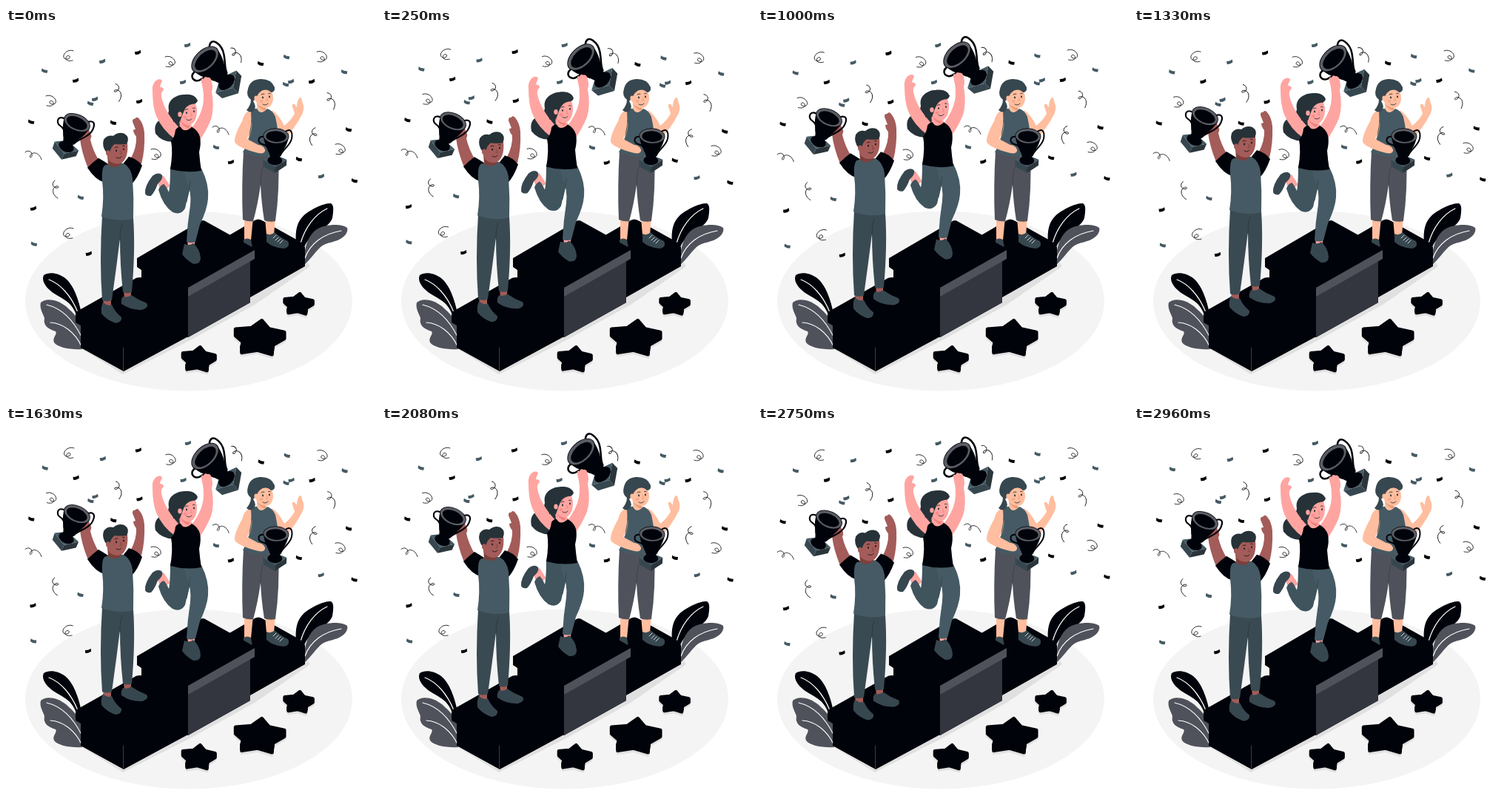
Animation, 500 px wide and 500 px high, one loop 3 s. Source, as an HTML page with a canvas:

```html
<!DOCTYPE html>
<html lang="en">
<head>
<meta charset="utf-8">
<title>Winners</title>
<style>
html, body { margin: 0; width: 100%; height: 100%; overflow: hidden; background: #fff; }
canvas { display: block; width: 500px; height: 500px; }
</style>
</head>
<body>
<canvas id="stage"></canvas>
<script>
const canvas = document.getElementById('stage');
const ctx = canvas.getContext('2d');
const ratio = window.devicePixelRatio || 1;
canvas.width = canvas.height = 500 * ratio;

const INK = '#01030a', HAIR = '#263238', SLATE = '#455a64', DEEP = '#37474f';
const GREY = '#50525b', FACE = '#33363f', LIGHT = '#f4f4f4', SHADOW = '#e0e0e0';
const BROWN = '#a35c59', BROWN_DARK = '#7c403b';
const PINK = '#ffa5a1', PINK_DARK = '#ee827e';
const PEACH = '#ffbe9f', PEACH_DARK = '#eb9a75';

function fill(d, color) {
  ctx.fillStyle = color;
  ctx.fill(new Path2D(d));
}

function line(d, color, width = 1) {
  ctx.strokeStyle = color;
  ctx.lineWidth = width;
  ctx.lineCap = ctx.lineJoin = 'round';
  ctx.stroke(new Path2D(d));
}

function oval(x, y, rx, ry, color, turn = 0) {
  ctx.fillStyle = color;
  ctx.beginPath();
  ctx.ellipse(x, y, rx, ry, turn, 0, Math.PI * 2);
  ctx.fill();
}

function group(x, y, turn, sx, sy, draw) {
  ctx.save();
  ctx.translate(x, y);
  ctx.rotate(turn * Math.PI / 180);
  ctx.scale(sx, sy);
  draw();
  ctx.restore();
}

// x, y, slant
const darkBits = [
  [178, 33, -1], [94, 71, -1], [34, 127, 1], [180, 99, -1], [145, 128, 1], [344, 48, 1],
  [413, 72, -1], [304, 181, -1], [396, 177, 1], [463, 137, 1], [471, 206, 1], [112, 305, -1], [37, 244, -1]
];
const greyBits = [
  [52, 58, 1], [130, 45, -1], [245, 23, -1], [239, 73, -1], [120, 96, -1], [114, 102, 1], [379, 39, 1],
  [378, 76, 1], [385, 72, -1], [457, 59, 1], [284, 161, 1], [426, 200, -1], [101, 229, 1], [38, 292, 1]
];
const HOOK = 'M-7 -7 C0 -10 8 -3 6 2 C4 6 -3 4 -2 1 C-1 -2 4 0 3 4 C2 7 -3 7 -6 6';
const WAVE = 'M-11 -4 C-6 -8 -1 -4 -2 1 C-3 5 -6 3 -4 0 C-1 -5 8 -4 11 6';
// x, y, turn, flip
const hooks = [
  [84, 38, 0, -1], [61, 99, 0, 1], [222, 46, 0, 1], [427, 39, 0, 1],
  [452, 164, 0, 1], [203, 171, 0, 1], [84, 278, 0, -1]
];
const waves = [
  [151, 87, 55, 1], [311, 36, 30, 1], [439, 98, 45, 1], [415, 146, -55, -1],
  [290, 138, 0, 1], [37, 172, 0, 1], [67, 218, -75, -1]
];

function bits(list, color) {
  for (const [x, y, slant] of list) {
    group(x, y, 0, slant, 1, () => fill('M-3.6 -3.3 Q0 -.4 4.2 -1 L3.6 2.9 Q-.5 3.6 -4.2 .5Z', color));
  }
}

function curls(list, shape) {
  for (const [x, y, turn, flip] of list) {
    group(x, y, turn, flip, 1, () => line(shape, '#15181c', .9));
  }
}

function confetti(angle) {
  group(252, 161, angle, 1, 1, () => {
    ctx.translate(-252, -161);
    bits(greyBits, SLATE);
    bits(darkBits, INK);
    curls(hooks, HOOK);
    curls(waves, WAVE);
  });
}

function trophy(x, y, turn, size) {
  group(x, y, turn, size, size, () => {
    fill('M-16 33 L1 42 L1 50 L-15 42Z', DEEP);
    fill('M1 42 L16 31 L16 39 L1 50Z', '#2b363c');
    fill('M-16 33 L-2 25 L16 31 L1 42Z', SLATE);
    oval(0, 33, 10, 6.3, INK);
    line('M-15 2 C-26 0 -25 11 -18 12 S-10 17 -8 22', INK, 2);
    line('M13 -7 C22 -14 24 1 18 10 S9 20 7 26', INK, 2);
    fill('M-17 0 C-16 14 -8 20 -6 30 Q0 34 6 30 C8 20 16 14 17 0Z', INK);
    oval(0, 0, 17.5, 10.5, INK);
    oval(0, 0, 16.8, 9.8, '#5b5d65');
    oval(0, .6, 13.6, 7.4, INK);
  });
}

function starPath(x, y, rx, ry) {
  ctx.beginPath();
  for (let i = 0; i < 10; i++) {
    const a = (-84 + i * 36) * Math.PI / 180;
    const k = i % 2 ? .58 : 1;
    ctx.lineTo(x + rx * k * Math.cos(a), y + ry * k * Math.sin(a));
  }
  ctx.closePath();
}

function star(x, y, rx, ry, depth) {
  ctx.lineJoin = 'round';
  ctx.lineWidth = 4.5;
  for (let i = depth + 3; i >= 0; i--) {
    ctx.fillStyle = ctx.strokeStyle = i > depth ? SHADOW : INK;
    starPath(x, y + i, rx, ry);
    ctx.fill();
    ctx.stroke();
  }
}

function leaves() {
  fill('M392 292 C391 274 392 262 405 251 C416 243 431 236 439 237 C444 239 442 250 441 257 C435 273 414 272 403 296Z', INK);
  line('M398 291 C404 270 417 252 434 244', '#fff', 1.2);
  fill('M403 320 C402 300 407 281 420 272 C432 265 453 264 461 270 C463 275 458 283 448 287 C436 291 430 291 424 297 C416 305 412 312 403 320Z', GREY);
  line('M404 311 C411 291 429 278 453 274', '#fff', 1.2);
  fill('M51 334 C58 329 71 331 80 338 C91 347 98 365 103 390 L95 388 C88 366 70 365 59 354 C52 348 48 340 51 334Z', INK);
  line('M58 340 C74 346 88 362 97 384', '#fff', 1.2);
  fill('M47 371 C54 364 70 367 81 376 C92 386 99 393 103 405 L103 434 C88 435 70 432 65 425 C62 418 70 414 67 410 C55 406 50 401 52 392 C49 384 45 378 47 371Z', GREY);
  line('M55 374 C76 379 91 395 102 417', '#fff', 1.1);
  line('M60 398 C77 399 93 411 102 430', '#fff', 1.1);
}

function sidePodiums() {
  fill('M98 431 L158 468 L247 423 L336 374 L411 322 L404 312Z', SHADOW);
  leaves();
  fill('M300 281 L336 260 Q341 257 346 260 L398 289 L404 296 L404 322 L330 364 L300 330Z', INK);
}

function mainPodium() {
  fill('M94 384 L172 340 Q178 335 186 338 L260 380 L246 417 L159 464 L101 432 L101 402 L94 398Z', INK);
  line('M158.5 432 V463', '#4a4d55', .8);
  fill('M177 311 L261 262 Q266 258 271 262 L336 298 L336 312 L330 316 L330 371 L246 418 L183 380 L183 327 L177 323Z', INK);
  fill('M246 360 L330 313 L330 371 L246 418Z', FACE);
  fill('M246 351 L336 300 L336 312 L246 363Z', GREY);
}

function face(x, y, gap, lift, ink, blush) {
  oval(x, y, 1, 1.4, ink);
  oval(x + gap, y - lift, 1, 1.4, ink);
  line(`M${x - 2} ${y - 4} q2 -1.8 4 -.8 M${x + gap - 1.5} ${y - lift - 4.5} q2 -1 3 .4`, ink, .9);
  line(`M${x + gap * .55} ${y} l1.8 4 l-2.2 .4`, blush, .9);
  line(`M${x} ${y + 9} q4 2.6 7 -1`, ink, .9);
}

function thirdPlace() {
  fill('M322 256 H334 L331 287 H322Z M350 256 H364 L362 280 H352Z', PEACH);
  fill('M321 286 Q326 283 331 286 L333 298 H321Z', DEEP);
  fill('M352 278 Q358 281 363 276 Q372 284 381 288 Q385 296 375 298 Q361 297 352 289Z', DEEP);
  line('M361 284 l4 -4 M364 287 l4 -4 M367 289 l4 -4 M370 291 l4 -4', '#fff', .8);
  fill('M321 166 Q345 176 368 172 Q370 220 364 261 Q356 263 349 260 Q345 235 344 212 Q340 240 334 261 Q327 262 320 259 Q318 215 321 166Z', GREY);
  line('M344 212 Q344 196 347 188', '#3d3f48', .8);
  fill('M359 111 Q369 117 376 132 Q384 126 390 116 L387 106 Q386 102 390 103 L393 107 Q393 98 397 94 Q400 94 400 99 Q404 106 401 115 Q391 135 377 149 Q368 146 362 132Z', PEACH);
  fill('M339 100 L339 109 Q331 111 329 118 L363 120 Q360 111 352 110 L351 104Z', PEACH);
  fill('M331 112 Q336 108 339 109 Q344 119 353 109 Q360 111 364 120 Q369 140 368 172 Q345 177 320 168 Q329 152 329 140 Q326 124 331 112Z', SLATE);
  fill('M331 111 Q322 113 319 126 Q308 146 309 154 Q313 162 341 169 Q351 171 350 164 Q347 158 341 158 L326 150 Q333 136 331 111Z', PEACH);
  line('M328 149 Q332 140 332 128', PEACH_DARK, .7);
  fill('M337 92 Q337 78 352 78 Q362 85 361 97 Q359 107 352 108 Q342 108 338 100Z', PEACH);
  fill('M339 102 Q344 108 351 108 L351 112 Q343 110 339 102Z', PEACH_DARK);
  fill('M331 97 Q324 92 327 82 Q330 70 343 69 Q358 68 363 80 Q364 87 358 87 Q354 82 347 84 Q341 87 339 93 Q336 97 334 99 Q339 106 335 111 Q331 116 325 111 Q331 104 331 97Z', DEEP);
  oval(338, 95, 2.6, 3.4, PEACH);
  face(347, 94, 9, 1, HAIR, PEACH_DARK);
  oval(345, 99, 2.4, 1.8, 'rgba(240,130,110,.4)');
  trophy(365, 146, 3, 1);
}

function firstPlace() {
  fill('M203 205 L213 200 L222 214 L210 222Z', PINK);
  fill('M188 224 Q187 214 198 200 Q206 194 211 199 Q213 204 205 211 Q201 222 196 227 Q190 228 188 224Z', DEEP);
  fill('M245 285 H256 L254 296 H246Z', PINK);
  fill('M241 292 Q248 295 253 291 Q262 299 263 311 Q263 320 253 319 Q244 314 238 306Z', DEEP);
  fill('M222 188 Q222 213 220 222 Q216 213 213 211 Q208 213 206 219 Q212 240 225 249 Q236 254 242 244 L253 195Z', '#40545d');
  fill('M240 190 L264 190 Q275 212 273 231 Q272 245 262 266 L256 289 Q250 292 244 289 Q245 265 249 240 Q251 222 244 207Z', SLATE);
  line('M244 235 Q248 220 249 207', '#33444c', .9);

  fill('M256 96 Q250 88 234 91 Q217 97 220 112 Q219 121 209 124 Q199 129 202 143 Q212 156 230 154 Q240 148 236 128 Q238 115 246 106 Q259 106 256 96Z', HAIR);
  fill('M198 86 Q197 78 201 73 Q205 68 210 70 Q212 72 209 76 L208 80 Q213 80 213 84 Q209 87 210 93 Q214 113 234 135 L229 151 Q211 138 203 119 Q198 106 198 86Z', PINK);
  trophy(269, 43, -43.5, 1.28);
  fill('M264 73 Q263 67 267 69 Q268 65 272 67 Q277 66 278 73 Q280 80 278 86 Q282 108 277 124 Q270 141 260 154 L249 138 Q263 120 266 105 Q268 94 266 82Z', PINK);
  fill('M234 122 L235 136 L229 140 L233 150 L255 148 L253 136 L248 128Z', PINK);
  fill('M229 138 Q233 133 236 134 Q241 143 251 134 Q259 138 262 147 Q264 156 261 168 Q262 181 264 193 Q243 197 222 191 Q226 168 223 153 Q228 148 229 138Z', INK);
  fill('M234 115 Q233 104 250 97 Q259 102 258 115 Q257 129 247 132 Q238 132 234 122Z', PINK);
  fill('M235 124 Q240 132 248 132 L247 136 Q239 134 235 124Z', PINK_DARK);
  fill('M225 112 Q220 95 237 91 Q254 87 259 98 Q258 103 252 103 Q243 104 239 116 L235 127 L226 127Z', HAIR);
  oval(235, 117, 2.7, 3.4, PINK);
  face(244, 115, 10, 2, HAIR, PINK_DARK);
  oval(242, 121, 2.4, 1.8, 'rgba(235,90,95,.35)');
}

function secondPlace() {
  fill('M131 364 H142 V378 H132Z M159 352 H169 V368 H160Z', BROWN);
  fill('M131 371 Q138 377 143 374 Q147 384 156 391 Q157 398 148 399 Q136 395 129 386 Q128 377 131 371Z', DEEP);
  fill('M158 363 Q165 365 169 361 Q179 368 190 372 Q194 378 184 381 Q169 382 156 373Q155 367 158 363Z', DEEP);
  fill('M130 253 Q150 263 172 257 Q175 300 170 357 Q164 360 158 357 Q154 320 154 285 Q149 325 143 368 Q136 371 130 368 Q126 315 130 253Z', '#3a4a52');
  line('M154 287 Q154 273 157 265', '#2a373d', .9);

  fill('M100 139 Q102 132 108 133 Q113 136 113 142 Q117 145 114 151 Q117 165 126 180 L111 190 Q102 168 100 150Z', BROWN);
  fill('M171 127 Q171 122 174 123 Q177 119 180 123 Q186 130 187 142 Q188 165 183 184 L168 178 Q177 161 176 147 Q172 142 172 138 L175 137Z', BROWN);
  fill('M110 189 Q118 181 125 176 Q132 180 138 184 L133 209 Q121 206 110 189Z', INK);
  fill('M166 174 Q177 177 184 186 Q178 203 170 211 Q160 198 158 184Z', INK);
  fill('M133 186 Q145 181 159 183 Q169 189 171 203 Q173 230 172 258 Q150 263 129 255 Q133 230 130 207 Q129 190 133 186Z', SLATE);
  fill('M137 172 L155 177 L156 184 Q147 192 138 185Z', BROWN_DARK);
  fill('M136 158 Q135 172 139 179 Q148 187 157 182 Q166 174 164 155 Q150 148 136 158Z', BROWN);
  fill('M136 169 Q129 160 132 151 Q137 144 145 146 Q152 140 160 143 Q168 148 163 157 Q154 158 147 157 Q142 160 140 169Z', HAIR);
  oval(138, 169, 3, 3.7, BROWN);
  face(149, 166, 10, 2, '#1c1a1d', BROWN_DARK);
  trophy(96, 128, 24, 1.08);
}

const tri = p => 1 - Math.abs(2 * (p % 1) - 1);

function draw(ms) {
  const t = (ms + 20) % 3000;
  ctx.setTransform(ratio, 0, 0, ratio, 0, 0);
  ctx.fillStyle = '#fff';
  ctx.fillRect(0, 0, 500, 500);
  oval(247, 369, 221, 121.5, LIGHT);
  confetti(2 * tri(t / 1500 + .25) - 1);
  sidePodiums();
  thirdPlace();
  mainPodium();
  group(0, -10 * tri(t / 1500), 0, 1, 1, firstPlace);
  group(0, -10 * tri(t / 3000), 0, 1, 1, secondPlace);
  star(260, 445, 23, 14, 6);
  star(342, 415, 35, 20, 9);
  star(395, 371, 20, 12, 5);
}

const start = performance.now();
function tick() {
  draw((performance.now() - start) % 3000);
  requestAnimationFrame(tick);
}
tick();
</script>
</body>
</html>
```
